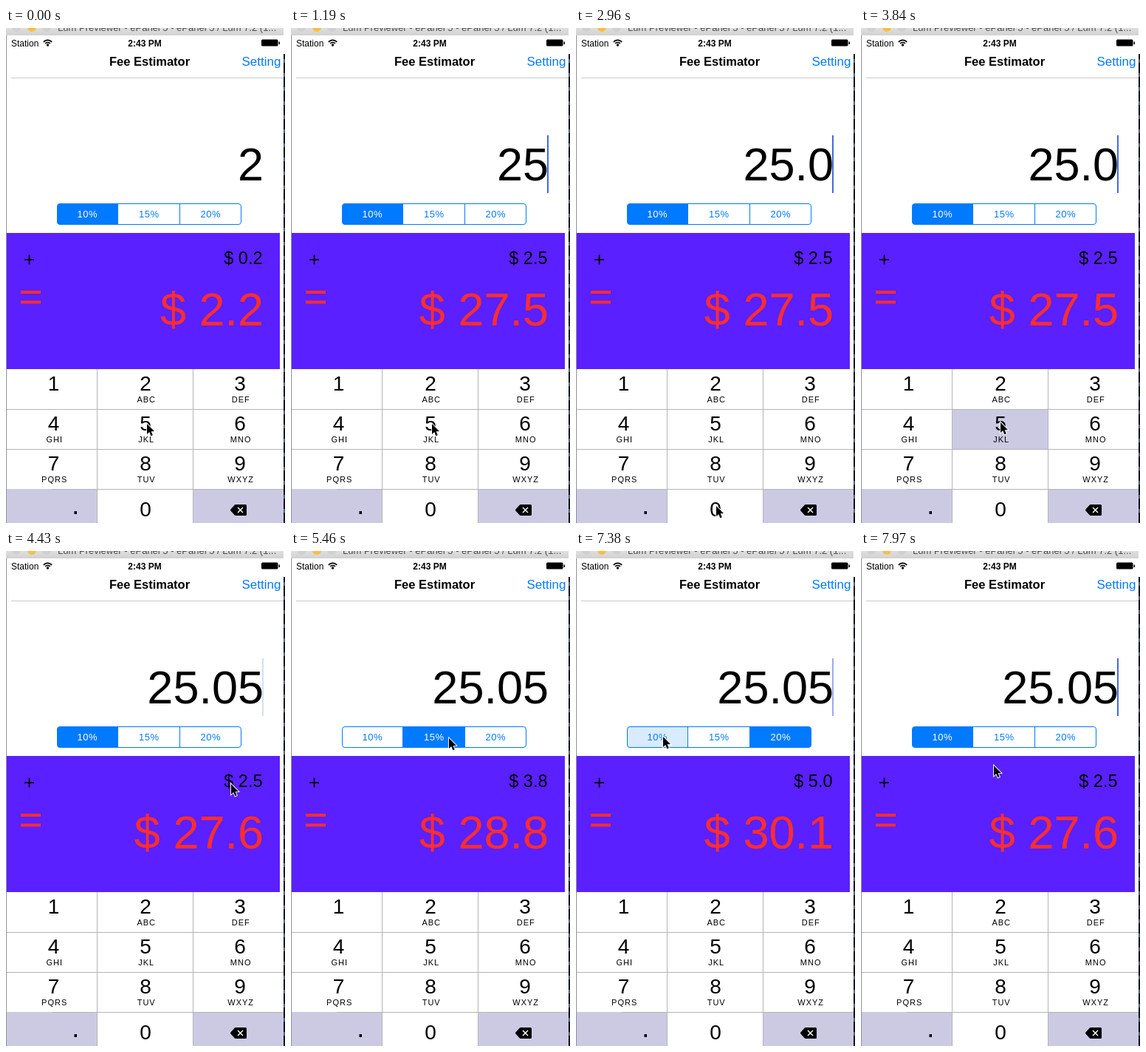
These frames come from a looping animation (378x669 px, 8000 ms). An HTML page with a canvas:

```html
<!DOCTYPE html>
<html lang="en">
<head>
<meta charset="utf-8">
<title>Fee Estimator</title>
<style>
  html, body { margin: 0; width: 100%; height: 100%; overflow: hidden; background: #fff; }
  canvas { display: block; width: 378px; height: 669px; }
</style>
</head>
<body>
<canvas id="stage" width="378" height="669"></canvas>
<script>
const ctx = document.getElementById('stage').getContext('2d');
const LOOP = 8000, TICK = 147.6;
const BLUE = '#007aff', GREY_KEY = '#cccae3', RED = '#ff2d2d';
const SANS = '"Liberation Sans", Arial, sans-serif';

// Everything advances in ticks; each list holds [tick, value...]
const entries = [
  [0, '2', '0.2', '2.2'], [8, '25', '2.5', '27.5'], [15, '25.', '2.5', '27.5'],
  [19, '25.0', '2.5', '27.5'], [27, '25.05', '2.5', '27.6'],
  [37, '25.05', '3.8', '28.8'], [43, '25.05', '5.0', '30.1'], [51, '25.05', '2.5', '27.6']
];
const selections = [[0, 0], [37, 1], [43, 2], [51, 0]];
const presses = { 36: 1, 42: 2, 50: 0 };
const pointer = [
  [0, 190, 534], [9, 190, 534], [11, 150, 582], [13, 88, 639], [15, 88, 639],
  [17, 189, 645], [21, 189, 645], [24, 188, 532], [28, 188, 532], [30, 304, 314],
  [31, 300, 308], [34, 213, 252], [38, 213, 252], [41, 275, 250], [45, 275, 250],
  [48, 117, 250], [52, 117, 250], [54, 179, 289]
];
// Caret opacity per tick, in ninths
const caret = '00099950' + '9952000' + '9950' + '9952000' + '9' + '9952000' + '9950059'.repeat(3);

const current = (list, tick) => list.filter(e => e[0] <= tick).pop();

function pointerAt(tick) {
  const i = pointer.findIndex(p => p[0] > tick);
  if (i < 0) return pointer[pointer.length - 1].slice(1);
  const [t0, x0, y0] = pointer[i - 1], [t1, x1, y1] = pointer[i];
  const f = (tick - t0) / (t1 - t0);
  return [x0 + (x1 - x0) * f, y0 + (y1 - y0) * f];
}

function rect(x, y, w, h, color) {
  ctx.fillStyle = color;
  ctx.fillRect(x, y, w, h);
}

function text(str, x, y, size, { color = '#000', align = 'left', weight = 400, gap = 0 } = {}) {
  ctx.font = `${weight} ${size}px ${SANS}`;
  ctx.letterSpacing = gap + 'px';
  ctx.textAlign = align;
  ctx.fillStyle = color;
  ctx.fillText(str, x, y);
}

function path(points, close = true) {
  ctx.beginPath();
  points.forEach(([x, y]) => ctx.lineTo(x, y));
  if (close) ctx.closePath();
}

function disc(x, y, r, color) {
  ctx.beginPath();
  ctx.arc(x, y, r, 0, Math.PI * 2);
  ctx.fillStyle = color;
  ctx.fill();
}

function drawFrame() {
  rect(0, 0, 378, 669, '#fff');
  const bar = ctx.createLinearGradient(0, 0, 0, 10);
  bar.addColorStop(0, '#dedede');
  bar.addColorStop(1, '#d2d2d2');
  rect(0, 0, 376, 10, bar);
  disc(14, -1, 6, '#d0d0d0');
  disc(35, -1, 6, '#fdbd3e');
  disc(55, -1, 6, '#d0d0d0');
  text('Lum Previewer - ePanel 5 - ePanel 5 / Lum 7.2 (1...', 70, 4, 13, { color: '#4c4c4c' });
  rect(376, 35, 2, 634, '#10131c');
  for (let y = 42; y < 669; y += 19) rect(376, y, 2, 5, '#4d6078');
  rect(0, 10, 1, 659, '#8e939c');
}

function drawStatus() {
  text('Station', 7, 24.5, 12);
  ctx.strokeStyle = '#000';
  ctx.lineWidth = 1.7;
  for (const r of [4.5, 7.6]) {
    ctx.beginPath();
    ctx.arc(56.5, 24, r, -Math.PI * 0.77, -Math.PI * 0.23);
    ctx.stroke();
  }
  disc(56.5, 23, 1.7, '#000');
  text('2:43 PM', 188, 24.5, 12, { align: 'center', weight: 700 });
  ctx.beginPath();
  ctx.roundRect(346, 15.5, 22.5, 9, 1.5);
  ctx.fillStyle = '#000';
  ctx.fill();
  rect(369.5, 18.5, 1.5, 3.5, '#000');
  text('Fee Estimator', 194.5, 51, 16.5, { align: 'center', weight: 700 });
  text('Setting', 319.5, 51, 17, { color: BLUE });
  rect(7, 67, 369, 1, '#c9c9cd');
}

function drawSegments(selected, pressed) {
  const edges = [69, 151.5, 235.5, 319];
  ctx.save();
  ctx.beginPath();
  ctx.roundRect(69.5, 237.5, 249, 28, 3.5);
  ctx.clip();
  for (let i = 0; i < 3; i++) {
    const fill = i === selected ? BLUE : i === pressed ? '#d9ebff' : '#fff';
    rect(edges[i], 237, edges[i + 1] - edges[i], 29, fill);
  }
  rect(151, 237, 1, 29, BLUE);
  rect(235, 237, 1, 29, BLUE);
  ctx.restore();
  ctx.strokeStyle = BLUE;
  ctx.lineWidth = 1;
  ctx.beginPath();
  ctx.roundRect(69.5, 237.5, 249, 28, 3.5);
  ctx.stroke();
  ['10%', '15%', '20%'].forEach((label, i) =>
    text(label, [110.3, 193.8, 277.3][i], 256, 13,
      { align: 'center', gap: 0.6, color: i === selected ? '#fff' : BLUE }));
}

function drawResult(tip, total) {
  rect(1, 277, 370, 184, '#5a20ff');
  rect(25, 312.3, 13, 1.7, '#000');
  rect(30.7, 306.5, 1.7, 13, '#000');
  text('$ ' + tip, 347.5, 319, 23.5, { align: 'right' });
  rect(20, 355, 27, 4, RED);
  rect(20, 368.5, 27, 4, RED);
  text('$ ' + total, 349, 401.5, 63, { align: 'right', color: RED });
}

function drawKeys(tick) {
  const xs = [64.5, 189, 317];
  const letters = ['', 'ABC', 'DEF', 'GHI', 'JKL', 'MNO', 'PQRS', 'TUV', 'WXYZ'];
  rect(1, 461, 375, 208, '#fff');
  for (const y of [515, 569, 623]) rect(1, y, 375, 1, '#b4b4b8');
  rect(1, 623, 61, 46, GREY_KEY);
  rect(62, 624, 61, 45, tick === 13 || tick === 14 ? '#fff' : GREY_KEY);
  rect(254, 624, 122, 45, GREY_KEY);
  if (tick === 26) rect(124, 516, 129, 53, GREY_KEY);
  for (const x of [123, 253]) rect(x, 461, 1, 208, '#b4b4b8');
  letters.forEach((label, i) => {
    const x = xs[i % 3], y = 490 + 54 * Math.floor(i / 3);
    text(i + 1, x, y, 28, { align: 'center' });
    text(label, x + 1.2, y + 16, 11, { align: 'center', gap: 1 });
  });
  text('0', 189, 659.5, 28, { align: 'center' });
  rect(92.5, 653, 3.5, 4, '#000');

  ctx.fillStyle = ctx.strokeStyle = '#000';
  ctx.lineJoin = 'round';
  ctx.lineWidth = 3;
  path([[305.5, 651.5], [311, 645.5], [324.5, 645.5], [324.5, 657.5], [311, 657.5]]);
  ctx.fill();
  ctx.stroke();
  ctx.strokeStyle = '#fff';
  ctx.lineWidth = 1.4;
  for (const s of [-1, 1]) {
    path([[314, 651.5 - 3.5 * s], [321, 651.5 + 3.5 * s]], false);
    ctx.stroke();
  }
}

function drawPointer(x, y) {
  ctx.save();
  ctx.translate(x + 1, y + 1);
  path([[0, 0], [0, 14], [3.2, 11], [5.4, 16.2], [7.8, 15.2], [5.6, 10.2], [10, 10]]);
  ctx.lineJoin = 'miter';
  ctx.lineWidth = 1.8;
  ctx.strokeStyle = '#fff';
  ctx.stroke();
  ctx.fillStyle = '#000';
  ctx.fill();
  ctx.restore();
}

function draw(ms) {
  const tick = Math.min(54, Math.floor((ms + 6) / TICK));
  const [, amount, tip, total] = current(entries, tick);
  drawFrame();
  drawStatus();
  text(amount, 349, 206, 63, { align: 'right' });
  ctx.globalAlpha = caret[tick] / 9;
  rect(347, 145, 2, 78, '#426be0');
  ctx.globalAlpha = 1;
  drawSegments(current(selections, tick)[1], presses[tick]);
  drawResult(tip, total);
  drawKeys(tick);
  drawPointer(...pointerAt(tick));
}

const start = performance.now();
function loop() {
  draw((performance.now() - start) % LOOP);
  requestAnimationFrame(loop);
}
loop();
</script>
</body>
</html>
```
